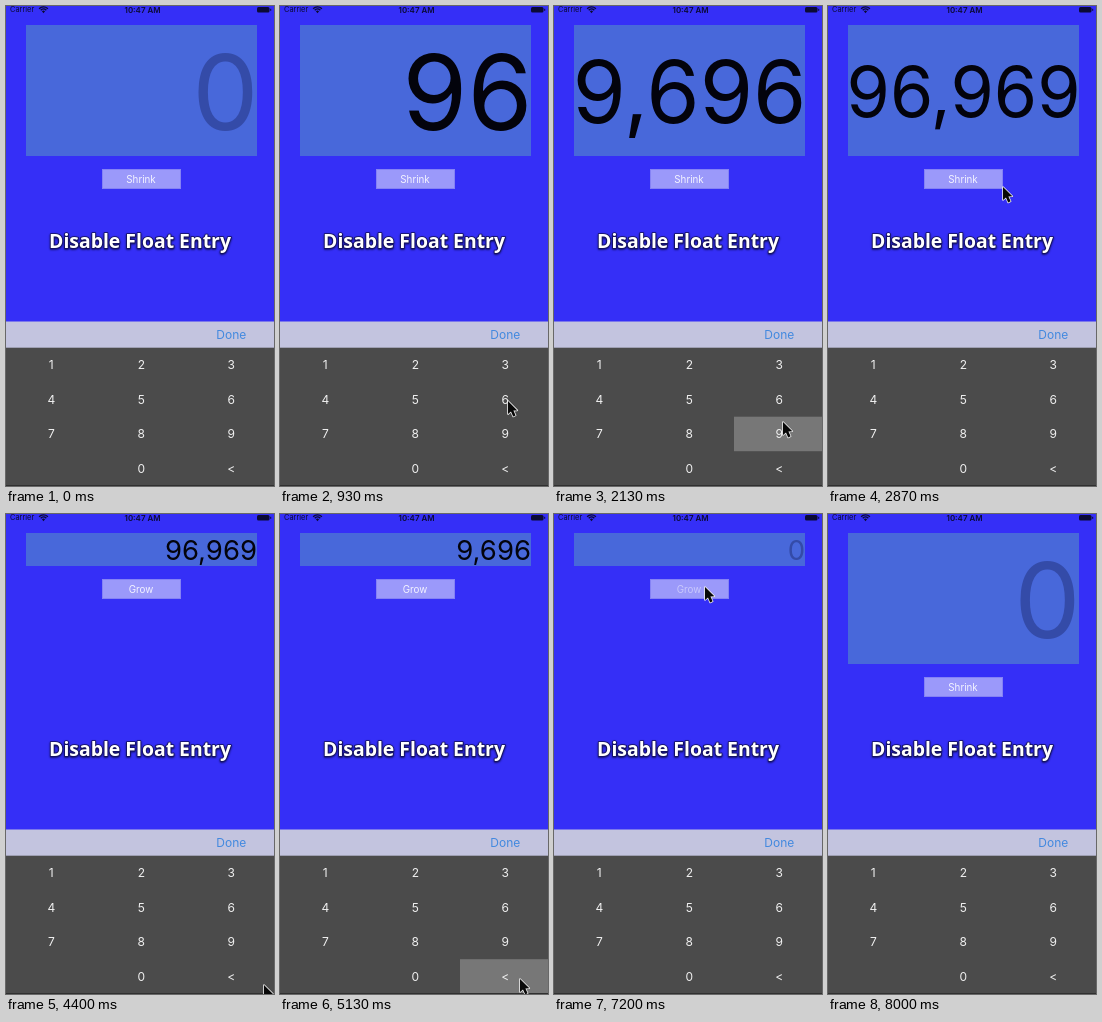
An HTML page with a canvas for the animation above (8.14 s loop, 268 by 480 pixels).

```html
<!DOCTYPE html>
<html lang="en">
<head>
<meta charset="utf-8">
<title>Number entry</title>
<style>
html, body { margin: 0; width: 100%; height: 100%; overflow: hidden; background: #352ff7; }
canvas { display: block; width: 268px; height: 480px; }
</style>
</head>
<body>
<canvas id="stage"></canvas>
<script>
const W = 268, H = 480, LOOP = 8140;
const SANS = 'Inter, Roboto, sans-serif';
const canvas = document.getElementById('stage');
const ratio = window.devicePixelRatio || 1;
canvas.width = W * ratio;
canvas.height = H * ratio;
const ctx = canvas.getContext('2d');

const KEYS = ['1', '2', '3', '4', '5', '6', '7', '8', '9', '', '0', '<'];
const KEY_TOP = 341.7, KEY_H = 34.5, KEY_W = 90;

// touch down, touch up, key
const PRESSES = [
  [400, 520, '9'], [740, 850, '6'], [1200, 1320, '9'], [1590, 1700, '6'], [2050, 2180, '9'],
  [4780, 4920, '<'], [5090, 5230, '<'], [5490, 5630, '<'], [5900, 6040, '<'], [6350, 6480, '<']
];

// time, x, y of the pointer tip
const PATH = [
  [70, 269, 300], [360, 229, 424], [540, 229, 424], [700, 228, 390], [870, 228, 390],
  [1120, 228, 424], [1360, 228, 424], [1580, 229, 391], [1730, 229, 391],
  [1960, 229, 416], [2620, 229, 416], [2870, 175, 181], [3000, 150, 171],
  [3530, 150, 171], [4000, 219, 226], [4200, 219, 226], [4400, 258, 471],
  [4500, 258, 471], [4700, 240, 465], [6500, 240, 465], [6670, 205, 150],
  [7000, 205, 150], [7200, 151, 73], [7860, 151, 73], [7990, 160, -20]
];

const clamp = v => Math.max(0, Math.min(1, v));
const smooth = v => v * v * (3 - 2 * v);
const span = (t, a, b) => smooth(clamp((t - a) / (b - a)));
const mix = (a, b, k) => a + (b - a) * k;

function rect(x, y, w, h, color) {
  ctx.fillStyle = color;
  ctx.fillRect(x, y, w, h);
}

function label(str, x, y, size, color, weight = 400, align = 'center') {
  ctx.font = `${weight} ${size}px ${SANS}`;
  ctx.textAlign = align;
  ctx.fillStyle = color;
  ctx.fillText(str, x, y + size * 0.364);
}

function valueAt(t) {
  let digits = '';
  for (const [, up, key] of PRESSES) {
    if (t >= up) digits = key === '<' ? digits.slice(0, -1) : digits + key;
  }
  return digits.replace(/\B(?=(\d{3})+$)/g, ',');
}

function fitSize(str) {
  ctx.font = `400 100px ${SANS}`;
  return Math.min(105, 100 * 234 / ctx.measureText(str).width);
}

function drawStatus() {
  label('Carrier', 4, 3.6, 7.4, '#0b0a35', 400, 'left');
  label('10:47 AM', 136.5, 3.7, 7.9, '#0b0a35', 600);
  ctx.strokeStyle = ctx.fillStyle = '#0b0a35';
  ctx.lineWidth = 1.3;
  for (const r of [3.8, 6]) {
    ctx.beginPath();
    ctx.arc(37.5, 6.8, r, -Math.PI * 0.76, -Math.PI * 0.24);
    ctx.stroke();
  }
  ctx.beginPath();
  ctx.moveTo(37.5, 7.2);
  ctx.arc(37.5, 6.8, 2.2, -Math.PI * 0.76, -Math.PI * 0.24);
  ctx.fill();
  ctx.beginPath();
  ctx.roundRect(251, 1, 12.5, 5.6, 1.5);
  ctx.fill();
  ctx.fillRect(264.2, 2.8, 1, 2);
}

function drawDisplay(t) {
  const small = span(t, 3030, 3430) - span(t, 7280, 7700);
  const text = valueAt(t);
  const boxH = mix(131, 33, small);
  rect(20, 19, 231, boxH, '#4868da');
  ctx.save();
  ctx.beginPath();
  ctx.rect(18, 19, 234, boxH);
  ctx.clip();
  const size = mix(fitSize(text || '0'), 27.5, small);
  label(text || '0', mix(252.5, 251, small), 19 + boxH / 2 + mix(1.5, 0, small), size,
    text ? '#03030c' : '#344ba8', 400, 'right');
  ctx.restore();

  const top = 32 + boxH;
  const pressed = (t > 2990 && t < 3080) || (t > 7200 && t < 7300);
  rect(96, top, 79, 20, '#8582f5');
  rect(97, top + 1, 77, 18, '#9b99fa');
  label(small > 0.5 ? 'Grow' : 'Shrink', 135, top + 10.3, 9.8, pressed ? '#c9c8fc' : '#f4f4ff');
}

function drawTitle() {
  ctx.font = '700 21px "Noto Sans", "Open Sans", sans-serif';
  ctx.font = `700 ${21 * 182 / ctx.measureText('Disable Float Entry').width}px "Noto Sans", "Open Sans", sans-serif`;
  ctx.textAlign = 'center';
  ctx.save();
  ctx.shadowColor = '#080840';
  ctx.shadowBlur = 2 * ratio;
  ctx.shadowOffsetY = ratio;
  ctx.lineJoin = 'round';
  ctx.lineWidth = 1.6;
  ctx.strokeStyle = '#15125c';
  ctx.strokeText('Disable Float Entry', 134, 242);
  ctx.restore();
  ctx.fillStyle = '#fff';
  ctx.fillText('Disable Float Entry', 134, 242);
}

function drawKeypad(t) {
  rect(0, 315.5, W, 27, '#c3c4df');
  label('Done', 225.3, 328.5, 12, '#4389df');
  rect(0, KEY_TOP, W, H - KEY_TOP, '#4b4b4b');
  const hit = PRESSES.find(([down, up]) => t >= down && t < up + 40);
  KEYS.forEach((key, i) => {
    const x = (i % 3) * KEY_W, y = KEY_TOP + Math.floor(i / 3) * KEY_H;
    if (hit && hit[2] === key) rect(x, y, KEY_W, KEY_H, '#777');
    label(key, x + 45.3, y + 17.3, 12, '#f0f0f0');
  });
  rect(0, 479, W, 1, '#303030');
}

function drawPointer(t) {
  const last = PATH.length - 1;
  if (t < PATH[0][0] || t > PATH[last][0]) return;
  const i = PATH.findIndex(p => p[0] >= t) || 1;
  const [t0, x0, y0] = PATH[i - 1], [t1, x1, y1] = PATH[i];
  const k = span(t, t0, t1);
  ctx.save();
  ctx.translate(mix(x0, x1, k), mix(y0, y1, k));
  ctx.beginPath();
  [[0, 0], [0, 13], [3, 10.4], [5.2, 15.4], [7.6, 14.3], [5.4, 9.5], [9.3, 9.3]]
    .forEach(([x, y]) => ctx.lineTo(x, y));
  ctx.closePath();
  ctx.lineJoin = 'round';
  ctx.lineWidth = 1.6;
  ctx.strokeStyle = '#eee';
  ctx.stroke();
  ctx.fillStyle = '#080808';
  ctx.fill();
  ctx.restore();
}

function draw(t) {
  ctx.setTransform(ratio, 0, 0, ratio, 0, 0);
  rect(0, 0, W, H, '#352ff7');
  drawStatus();
  drawDisplay(t);
  drawTitle();
  drawKeypad(t);
  drawPointer(t);
}

const start = performance.now();
function tick() {
  draw((performance.now() - start) % LOOP);
  requestAnimationFrame(tick);
}
tick();
</script>
</body>
</html>
```
